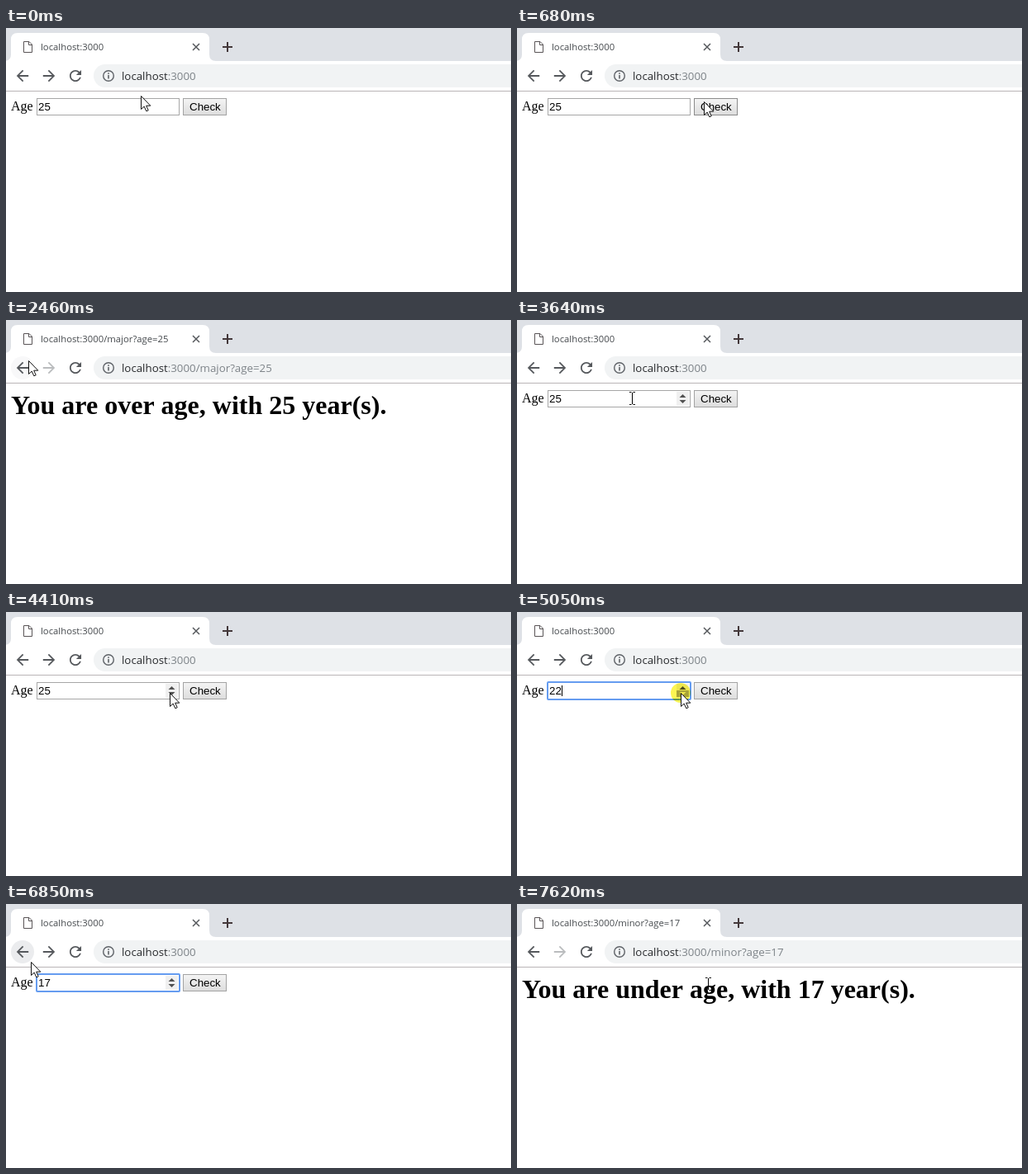
An HTML page with a canvas for the animation above (8 s loop, 611x320 px).

```html
<!DOCTYPE html>
<html lang="en">
<head>
<meta charset="utf-8">
<title>Age check</title>
<style>
  html, body { margin: 0; width: 100%; height: 100%; overflow: hidden; background: #fff; }
  canvas { display: block; }
</style>
</head>
<body>
<canvas id="stage" width="611" height="320"></canvas>
<script>
const ctx = document.getElementById('stage').getContext('2d');
const LOOP = 8000;
const UI = '"Open Sans", sans-serif';
const SERIF = '"Liberation Serif", serif';
const SANS = '"Liberation Sans", sans-serif';

const shapes = {
  tab: new Path2D('M-2 40Q6 40 6 32V14Q6 6 14 6H238Q246 6 246 14V32Q246 40 254 40Z'),
  back: new Path2D('M20 11H7.83l5.59-5.59L12 4l-8 8 8 8 1.41-1.41L7.83 13H20z'),
  reload: new Path2D('M17.65 6.35C16.2 4.9 14.21 4 12 4c-4.42 0-8 3.58-8 8s3.58 8 8 8c3.73 0 6.84-2.55 7.73-6h-2.08c-.82 2.33-3.04 4-5.65 4-3.31 0-6-2.69-6-6s2.69-6 6-6c1.66 0 3.14.69 4.22 1.78L13 11h7V4z'),
  page: new Path2D('M21.5 16.5H28L31.5 20V29.5H21.5ZM27.5 16.5V20.5H31.5'),
  arrow: new Path2D('M.5 .5V16.5L4.2 13.1L6.8 18.8L9.2 17.8L6.7 12.2H11.8Z'),
  beam: new Path2D('M-3 -7.5H-.5M1.5 -7.5H4M.5 -7V7M-3 7.5H-.5M1.5 7.5H4')
};

// Pointer moves: start, end, number of steps, target, optional bend
const moves = [
  [70, 760, 10, [233, 93], [198, 72]],
  [1850, 2460, 9, [27, 49], [130, 78]],
  [2535, 2610, 2, [24, 52]],
  [2930, 3550, 9, [143, 91], [85, 78]],
  [3640, 3640, 1, [139, 95]],
  [3790, 4410, 9, [198, 98], [170, 94]],
  [6440, 6680, 4, [26, 69]],
  [6850, 6850, 1, [30, 70]],
  [6930, 7390, 7, [231, 95], [130, 90]],
  [7620, 7620, 1, [231, 97]]
];
const presses = [[1220, 1300], [2770, 2850], [4580, 4650], [4900, 4975], [5050, 5200],
  [5280, 5510], [5750, 5830], [6130, 6210], [7465, 7540]];
const decrements = [4580, 4900, 5050, 5280, 5355, 5430, 5750, 6130];

const within = (t, a, b) => t >= a && t < b;
const ramp = (t, a, b) => Math.min(1, Math.max(0, (t - a) / (b - a)));
const inside = (p, x, y, w, h) => within(p[0], x, x + w) && within(p[1], y, y + h);

function pointerAt(t) {
  let from = [163, 82];
  for (const [start, end, steps, to, bend] of moves) {
    if (t < start) break;
    const gap = (end - start) / (steps - 1) || 1;
    const k = Math.min(steps, Math.floor((t - start) / gap + 1.001)) / steps;
    if (k === 1) { from = to; continue; }
    const u = k * k * (3 - 2 * k);
    return from.map((a, i) => {
      const b = bend ? bend[i] : (a + to[i]) / 2;
      return (1 - u) ** 2 * a + 2 * u * (1 - u) * b + u * u * to[i];
    });
  }
  return from;
}

function rect(x, y, w, h, color) {
  ctx.fillStyle = color;
  ctx.fillRect(x, y, w, h);
}

function frame(x, y, w, h, color, width = 1) {
  ctx.strokeStyle = color;
  ctx.lineWidth = width;
  ctx.strokeRect(x, y, w, h);
}

function disc(x, y, r, color) {
  ctx.fillStyle = color;
  ctx.beginPath();
  ctx.arc(x, y, r, 0, 7);
  ctx.fill();
}

function polyline(color, width, ...lines) {
  ctx.strokeStyle = color;
  ctx.lineWidth = width;
  ctx.beginPath();
  for (const [x1, y1, x2, y2] of lines) {
    ctx.moveTo(x1, y1);
    ctx.lineTo(x2, y2);
  }
  ctx.stroke();
}

function text(string, x, y, font, color = '#000') {
  ctx.font = font;
  ctx.fillStyle = color;
  ctx.fillText(string, x, y);
  return x + ctx.measureText(string).width;
}

function icon(path, x, y, scale, color, flip = 1) {
  ctx.save();
  ctx.translate(x, y);
  ctx.scale(scale * flip, scale);
  ctx.translate(-12, -12);
  ctx.fillStyle = color;
  ctx.fill(path);
  ctx.restore();
}

function triangle(x, y, dir, color) {
  ctx.fillStyle = color;
  ctx.beginPath();
  ctx.moveTo(x - 4, y);
  ctx.lineTo(x + 4, y);
  ctx.lineTo(x, y - 4 * dir);
  ctx.fill();
}

function drawBrowser(path, forward, hover) {
  rect(0, 0, 611, 320, '#fff');
  rect(0, 0, 611, 40, '#dee1e6');
  ctx.fillStyle = '#fff';
  ctx.fill(shapes.tab);
  ctx.strokeStyle = '#5a5557';
  ctx.lineWidth = 1;
  ctx.stroke(shapes.page);
  text('localhost:3000' + path, 42, 27, '11.3px ' + UI, '#45494d');
  polyline('#55585c', 1.5, [226, 19, 234, 27], [234, 19, 226, 27]);
  polyline('#43383a', 2, [262, 23, 274, 23], [268, 17, 268, 29]);

  ctx.globalAlpha = hover;
  disc(20, 58, 14, '#ebecee');
  ctx.globalAlpha = 1;
  icon(shapes.back, 20, 58, 0.9, '#55585c');
  icon(shapes.back, 52, 58, 0.9, forward ? '#55585c' : '#babcbe', -1);
  icon(shapes.reload, 84, 58, 0.88, '#55585c');

  ctx.fillStyle = '#f1f3f4';
  ctx.beginPath();
  ctx.roundRect(106, 44, 530, 28, 14);
  ctx.fill();
  ctx.strokeStyle = '#5f6368';
  ctx.lineWidth = 1.4;
  ctx.beginPath();
  ctx.arc(124, 58, 6.3, 0, 7);
  ctx.stroke();
  rect(123.2, 57, 1.6, 4.5, '#5f6368');
  rect(123.2, 54.3, 1.6, 1.6, '#5f6368');
  const end = text('localhost', 140, 63, '13.3px ' + UI, '#27292c');
  text(':3000' + path, end, 63, '13.3px ' + UI, '#7d8388');
  rect(0, 76, 611, 1, '#b9b5b7');
}

function drawForm(t, age, pointer, pressed) {
  const focused = t >= 4580;
  text('Age', 6, 100, '16px ' + SERIF);
  frame(37.5, 85.5, 172, 20, '#a6a6a6');
  if (focused) {
    ctx.strokeStyle = '#659cf0';
    ctx.lineWidth = 2;
    ctx.beginPath();
    ctx.roundRect(37, 85, 173, 21, 1);
    ctx.stroke();
  }
  text(age, 39, 100, '13.333px ' + SANS);
  if (within(t, 4580, 6630) || within(t, 7130, LOOP)) rect(54, 89, 1, 13, '#000');

  if (focused || inside(pointer, 37, 85, 173, 21)) {
    const down = pressed && pointer[0] < 210;
    rect(193, 87, 15, 17, '#f0f0f0');
    if (down) rect(193, 95, 15, 8, '#aaa');
    triangle(200.5, 94, 1, '#505050');
    triangle(200.5, 97, -1, down ? '#f0f0f0' : '#505050');
  }

  const hover = inside(pointer, 214, 85, 53, 21);
  const shade = ctx.createLinearGradient(0, 85, 0, 106);
  const tones = pressed && hover ? ['#d5d5d5', '#eee'] : ['#f5f5f5', '#dcdcdc'];
  tones.forEach((tone, i) => shade.addColorStop(i, tone));
  rect(214, 85, 53, 21, shade);
  frame(214.5, 85.5, 52, 20, hover ? '#8b8b8b' : '#a3a3a3');
  text('Check', 222, 100, '13.333px ' + SANS);
}

function drawPointer(t, pointer, form) {
  const [x, y] = pointer.map(Math.round);
  const overText = form
    ? inside(pointer, 38, 86, 155, 19)
    : inside(pointer, 6, 87, 460, 34) && !within(t, 1300, 1850) && !within(t, 7540, 7620);
  ctx.save();
  ctx.translate(x, y);
  if (overText || inside(pointer, 136, 44, 475, 28)) {
    ctx.strokeStyle = '#000';
    ctx.lineWidth = 1;
    ctx.stroke(shapes.beam);
  } else {
    ctx.fillStyle = '#fff';
    ctx.strokeStyle = '#111';
    ctx.lineWidth = 1;
    ctx.fill(shapes.arrow);
    ctx.stroke(shapes.arrow);
  }
  ctx.restore();
}

function draw(t) {
  const major = within(t, 1300, 2850);
  const minor = t >= 7540;
  const form = !major && !minor;
  const age = 25 - decrements.filter(at => t >= at).length;
  const pointer = pointerAt(t);
  const pressed = presses.some(([a, b]) => within(t, a, b));
  const hover = t < 4000
    ? ramp(t, 2380, 2610) * (1 - ramp(t, 2930, 3080))
    : (t >= 6850) * (1 - ramp(t, 6930, 7080));

  const path = form ? '' : `/${major ? 'major' : 'minor'}?age=${age}`;
  drawBrowser(path, form, hover);
  if (form) drawForm(t, age, pointer, pressed);
  else text(`You are ${major ? 'over' : 'under'} age, with ${age} year(s).`, 6, 114, 'bold 32px ' + SERIF);

  if (pressed) {
    ctx.globalCompositeOperation = 'multiply';
    disc(pointer[0], pointer[1], 12, '#fcf553');
    ctx.globalCompositeOperation = 'source-over';
  }
  drawPointer(t, pointer, form);
}

const began = performance.now();
function tick() {
  draw((performance.now() - began) % LOOP);
  requestAnimationFrame(tick);
}
tick();
</script>
</body>
</html>
```
